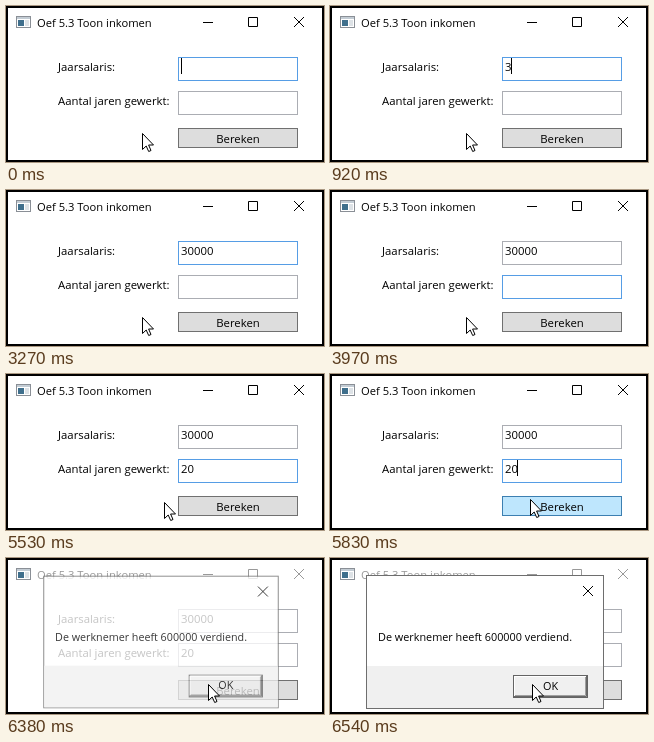
Recreate the animation shown at these times as an HTML page. Size 318 px wide and 156 px high, loop 8 s.

```html
<!DOCTYPE html>
<html lang="nl">
<head>
<meta charset="utf-8">
<title>Toon inkomen</title>
<style>
  html, body { margin: 0; width: 100%; height: 100%; overflow: hidden; background: #fff; }
  svg { display: block; width: 318px; height: 156px; }
  text { font: 11.35px "Open Sans", "Noto Sans", sans-serif; fill: #000; white-space: pre; }
  .mid { text-anchor: middle; }
  .line { fill: none; stroke: #000; }
</style>
</head>
<body>
<svg viewBox="0 0 318 156">
  <rect width="318" height="156" fill="#fff"/>

  <!-- title bar -->
  <rect x="10.5" y="10.5" width="14" height="11" fill="#fff" stroke="#8a8f96"/>
  <rect x="11" y="11" width="13" height="2" fill="#c3ccd4"/>
  <rect x="12" y="14" width="6" height="6" fill="#3f6f8c"/>
  <rect x="19" y="14" width="4" height="6" fill="#dde2e6"/>
  <text id="title" x="31" y="21" style="font-size:11.2px">Oef 5.3 Toon inkomen</text>
  <path id="controls" class="line" d="M197 16.5h10M242.5 11.5h9v9h-9zM288 11l10 10M298 11l-10 10"/>

  <!-- form -->
  <text x="52" y="65">Jaarsalaris:</text>
  <text x="52" y="99">Aantal jaren gewerkt:</text>
  <rect id="box0" x="172.5" y="51.5" width="119" height="23" fill="#fff"/>
  <rect id="box1" x="172.5" y="85.5" width="119" height="23" fill="#fff"/>
  <text id="value0" x="175" y="65"></text>
  <text id="value1" x="175" y="99"></text>
  <rect id="caret" width="1" height="16"/>
  <rect id="button" x="172.5" y="122.5" width="119" height="19"/>
  <text class="mid" x="232" y="137">Bereken</text>

  <!-- message box -->
  <g id="dialog">
    <rect x="36.5" y="17.5" width="237" height="133" fill="#fff" stroke="#6e6e6e"/>
    <rect x="37" y="108" width="236" height="42" fill="#f0f0f0"/>
    <path class="line" d="M253 28l10 10M263 28l-10 10"/>
    <text x="48" y="83" style="font-size:10.85px">De werknemer heeft 600000 verdiend.</text>
    <rect x="183.5" y="117.5" width="74" height="22" fill="#f0f0f0" stroke="#646464"/>
    <path class="line" d="M184.5 138V118.5H256" style="stroke:#fff"/>
    <path class="line" d="M185 137.5H255.5V119" style="stroke:#a0a0a0"/>
    <path class="line" d="M184 138.5H256.5V118" style="stroke:#696969"/>
    <text class="mid" x="220.5" y="132" style="font-size:10.85px">OK</text>
  </g>

  <path id="cursor" d="M.5 .5V16.5L4.2 13L6.7 18.5L9 17.5L6.6 12H11.5Z" fill="#fff" stroke="#000"/>
  <rect x="1" y="1" width="316" height="154" fill="none" stroke="#000" stroke-width="2"/>
</svg>
<script>
const LOOP = 8000, TAB = 3410, CLICK = 6070, OPEN = 6220;
const $ = id => document.getElementById(id);
const set = (id, attrs) => {
  for (const name in attrs) $(id).setAttribute(name, attrs[name]);
};

// Key press times for each field
const fields = [
  { text: '30000', keys: [920, 1470, 1950, 2250, 2730], y: 52 },
  { text: '20', keys: [4360, 4830], y: 86 }
];
// Times at which the caret turns off and on in turn
const blinks = [70, 700, 2250, 2330, 3270, TAB, 3970, 4430, 5370, 5830];
// Mouse positions: time, x, y
const path = [
  [0, 136, 127], [5530, 158, 128], [5590, 176, 127], [5670, 188, 126],
  [5750, 196, 125], [5830, 200, 125], [5910, 201, 125], [5990, 202, 126]
];

const passed = (times, t) => times.filter(at => at <= t).length;

function drawForm(t) {
  const focus = t < TAB ? 0 : t < CLICK ? 1 : -1;
  fields.forEach((field, i) => {
    const count = passed(field.keys, t);
    $('value' + i).textContent = field.text.slice(0, count);
    set('box' + i, { stroke: i === focus ? '#569de5' : '#abadb3' });
    if (i === focus) set('caret', { x: Math.floor(175 + 6.47 * count), y: field.y });
  });
  const shown = focus >= 0 && passed(blinks, t) % 2 === 0;
  set('caret', { opacity: shown ? 1 : 0 });
}

function drawMouse(t) {
  const [, x, y] = path[passed(path.map(p => p[0]), t) - 1];
  set('cursor', { transform: `translate(${x} ${y})` });
  const [fill, stroke] =
    t >= OPEN || x < 172 ? ['#ddd', '#707070'] :
    t >= CLICK ? ['#c4e5f6', '#2c628b'] : ['#bee6fd', '#3c7fb1'];
  set('button', { fill, stroke });
}

function drawDialog(t) {
  const open = t >= OPEN;
  const step = Math.min(4, Math.floor((t - OPEN) / 80));
  const p = 1 - (1 - step / 4) ** 2;
  const scale = 0.958 + 0.042 * p;
  set('dialog', {
    opacity: open ? 0.1 + 0.9 * p : 0,
    transform: `translate(155 84) scale(${scale}) translate(-155 -84)`
  });
  $('title').style.fill = $('controls').style.stroke = open ? '#999' : '#000';
}

function frame(now) {
  const t = now % LOOP;
  drawForm(t);
  drawMouse(t);
  drawDialog(t);
  requestAnimationFrame(frame);
}
const start = performance.now();
requestAnimationFrame(function tick() {
  frame = null;
  const t = (performance.now() - start) % LOOP;
  drawForm(t);
  drawMouse(t);
  drawDialog(t);
  requestAnimationFrame(tick);
});
</script>
</body>
</html>
```
